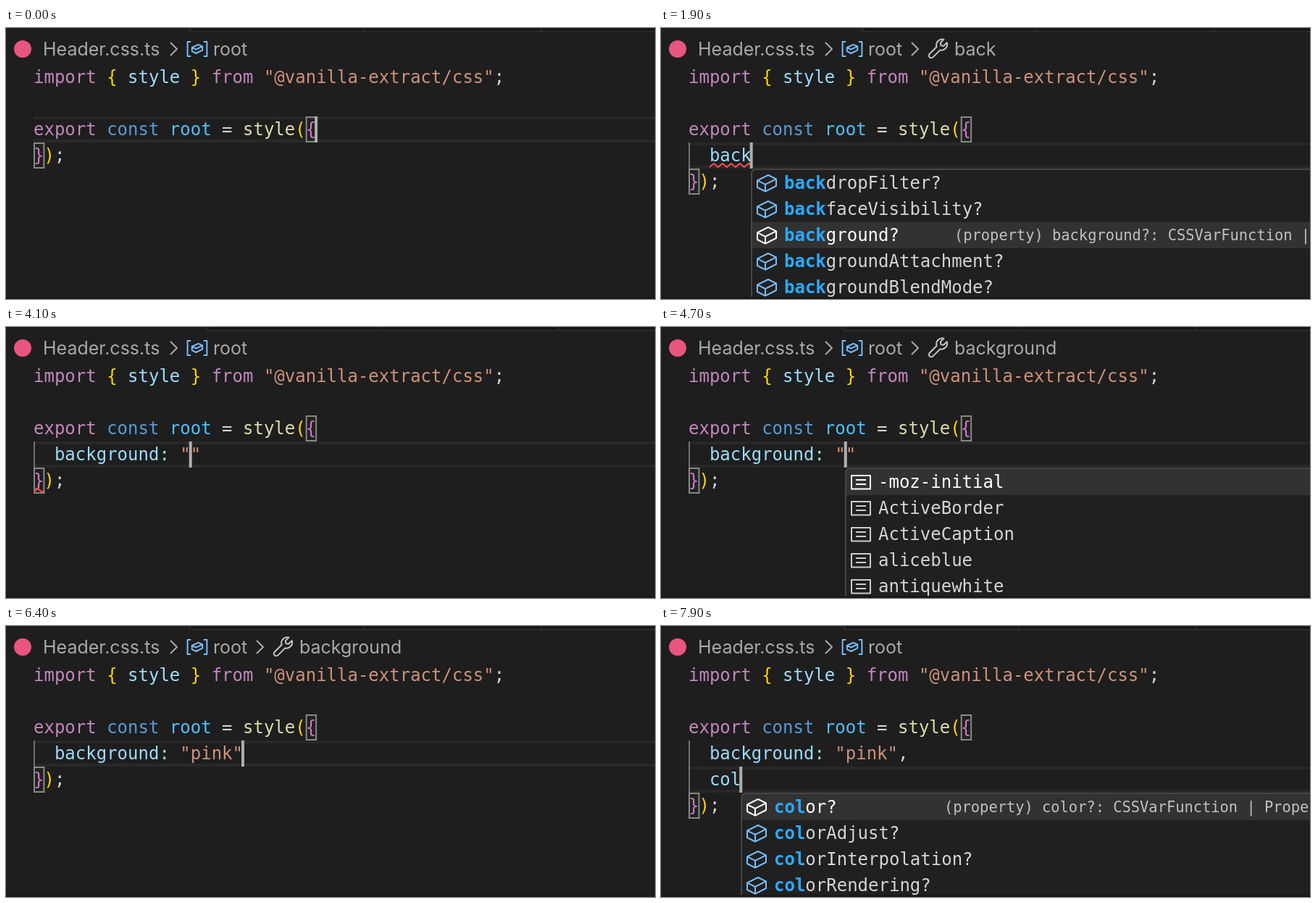
An HTML page with a canvas for the animation above (8000 ms loop, 896x374 px).

```html
<!DOCTYPE html>
<html lang="en">
<head>
<meta charset="utf-8">
<title>Typing styles in an editor</title>
<style>
  html, body { margin: 0; width: 100%; height: 100%; overflow: hidden; background: #1e1e1e; }
  canvas { display: block; }
</style>
</head>
<body>
<canvas id="stage" width="896" height="374"></canvas>
<script>
const ctx = document.getElementById('stage').getContext('2d');
const MONO = '"DejaVu Sans Mono", monospace';
const LOOP = 8000, LEFT = 38, TOP = 50, LINE = 36, CHAR = 24 * 0.60205;
const GOLD = '#ffd700', ORCHID = '#da70d6', PINK = '#c586c0', SKY = '#9cdcfe',
      STRING = '#ce9178', PLAIN = '#d4d4d4', BLUE = '#75beff';

const icons = {
  field: 'M1.5 6.2V11L7 13.8 14.5 10V5.2L9 2.5ZM1.5 6.2 7 8.9 14.5 5.2M7 8.9V13.8',
  value: 'M1.5 3.5H14.5V12.7H1.5ZM4.5 6.5H11.5M4.5 9.5H11.5',
  variable: 'M3.6 3H1.3V13H3.6M12.4 3H14.7V13H12.4M4.4 7V9.6L7.2 11 11.6 8.8V6.2L8.8 4.9ZM4.4 7 7.2 8.3 11.6 6.2',
  wrench: 'M13.9 4.1 11.6 6.4 9.7 6.1 9.4 4.2 11.7 1.9A4 4 0 0 0 6.8 7L1.9 11.9A1.5 1.5 0 0 0 4.2 14.2L9.2 9.2A4 4 0 0 0 13.9 4.1Z',
  chevron: 'M5.5 3.5 10 8 5.5 12.5'
};
for (const name in icons) icons[name] = new Path2D(icons[name]);

const back = ['backdropFilter?', 'backfaceVisibility?', 'background?', 'backgroundAttachment?', 'backgroundBlendMode?'];
const colors = ['color?', 'colorAdjust?', 'colorInterpolation?', 'colorRendering?'];
const pinkLine = '  background: "pink"';

// Each step changes part of the state; "inset" is the caret's distance from the line end.
const steps = [
  [0, { body: [], inset: 0, crumb: '', error: false, squiggle: null, list: null, icon: 'field', pick: 0, detail: false }],
  [200, { body: ['  '] }],
  [500, { body: ['  b'] }],
  [600, { body: ['  ba'], list: back }],
  [700, { body: ['  bac'] }],
  [800, { detail: true }],
  [900, { body: ['  back'] }],
  [1400, { crumb: 'back', error: true, squiggle: [3, 2, 4] }],
  [1500, { pick: 1 }],
  [1700, { pick: 2 }],
  [2100, { body: ['  background'], list: null, pick: 0, detail: false }],
  [2600, { crumb: 'background', squiggle: [3, 2, 10] }],
  [3100, { body: ['  background:'] }],
  [3200, { body: ['  background: '] }],
  [3500, { crumb: '', squiggle: [4, 0, 1] }],
  [3900, { body: ['  background: ""'], inset: 1 }],
  [4300, { list: ['-moz-initial', 'ActiveBorder', 'ActiveCaption', 'aliceblue', 'antiquewhite'], icon: 'value' }],
  [4500, { crumb: 'background', error: false, squiggle: null }],
  [5100, { body: ['  background: "p"'], list: ['padding-box', 'palegoldenrod', 'palegreen', 'paleturquoise', 'palevioletred'] }],
  [5300, { body: ['  background: "pi"'], list: ['pink', 'padding-box', 'paleturquoise', 'palevioletred', 'papayawhip'] }],
  [5400, { body: ['  background: "pin"'], list: ['pink', 'padding-box'] }],
  [5600, { body: [pinkLine], list: ['pink'] }],
  [5800, { list: null }],
  [6100, { inset: 0 }],
  [6500, { body: [pinkLine + ','] }],
  [7000, { body: [pinkLine + ',', '  '], crumb: '' }],
  [7200, { body: [pinkLine + ',', '  c'], icon: 'field' }],
  [7300, { list: ['captionSide?', 'caret?', 'caretColor?', 'clear?'] }],
  [7400, { body: [pinkLine + ',', '  co'], list: colors }],
  [7600, { body: [pinkLine + ',', '  col'] }],
  [7700, { detail: true }]
];

const colX = col => LEFT + col * CHAR;
const rowY = row => TOP + row * LINE;

function rect(color, x, y, w, h) {
  ctx.fillStyle = color;
  ctx.fillRect(x, y, w, h);
}

function text(str, x, y, color, font = '24px ' + MONO) {
  ctx.font = font;
  ctx.fillStyle = color;
  ctx.fillText(str, x, y);
}

function icon(name, x, y, color, width = 1) {
  ctx.save();
  ctx.translate(x, y);
  ctx.scale(2, 2);
  ctx.strokeStyle = color;
  ctx.lineWidth = width;
  ctx.lineJoin = 'round';
  ctx.stroke(icons[name]);
  ctx.restore();
}

function codeLine(row, tokens) {
  let col = 0;
  for (const [str, color] of tokens) {
    text(str, colX(col), rowY(row) + 26, color);
    col += str.length;
  }
}

function bodyTokens(line) {
  return line.split(/("[^"]*"|,)/).map(s => [s, s[0] === '"' ? STRING : s === ',' ? PLAIN : SKY]);
}

function bracketBox(row, col) {
  rect('rgba(0,100,0,.1)', colX(col), rowY(row), CHAR, LINE);
  ctx.strokeStyle = '#888';
  ctx.lineWidth = 2;
  ctx.strokeRect(colX(col) + 1, rowY(row) + 1, CHAR - 1, LINE - 2);
}

function squiggle(row, col, len) {
  const end = colX(col + len), y = rowY(row) + 31.5;
  ctx.save();
  ctx.beginPath();
  ctx.rect(colX(col), y - 5, end - colX(col), 10);
  ctx.clip();
  ctx.beginPath();
  for (let x = colX(col), up = 1; x < end + 6; x += 6, up = -up) ctx.lineTo(x, y + up * 2.4);
  ctx.strokeStyle = '#f14c4c';
  ctx.lineWidth = 2;
  ctx.stroke();
  ctx.restore();
}

function header(s) {
  const shift = s.error ? 24.5 : 0;
  rect('#181818', 254 + shift, 0, 896, 5);
  rect('#2b2b2b', 254 + shift, 4, 896, 2);
  for (const x of [253, 493, 738]) rect('#2b2b2b', x + shift, 0, 2, 6);

  const font = '25px Inter, sans-serif', gray = '#a9a9a9';
  ctx.fillStyle = '#e8557f';
  ctx.beginPath();
  ctx.arc(23, 29, 12, 0, 7);
  ctx.fill();
  text('Header.css.ts', 51, 38, gray, font);
  icon('chevron', 216, 13, gray);
  icon('variable', 248, 13, BLUE);
  text('root', 286, 38, gray, font);
  if (s.crumb) {
    icon('chevron', 335, 13, gray);
    icon('wrench', 367, 12, '#c5c5c5');
    text(s.crumb, 405, 38, gray, font);
  }
}

// Draws a label with the letters of the query picked out in order.
function label(str, query, x, y, color) {
  let hit = 0;
  [...str].forEach((ch, i) => {
    const match = hit < query.length && ch.toLowerCase() === query[hit];
    if (match) hit++;
    text(ch, x + i * CHAR, y, match ? '#2aaaff' : color, (match ? 'bold ' : '') + '24px ' + MONO);
  });
}

function popup(s, x, y, query) {
  ctx.save();
  ctx.beginPath();
  ctx.roundRect(x + 1, y + 1, 860, s.list.length * LINE + 6, 6);
  ctx.fillStyle = '#202020';
  ctx.fill();
  ctx.save();
  ctx.clip();
  rect('#323232', x, y + 2 + s.pick * LINE, 862, LINE);
  ctx.restore();
  ctx.strokeStyle = '#454545';
  ctx.lineWidth = 2;
  ctx.stroke();
  ctx.restore();

  s.list.forEach((name, i) => {
    const top = y + 2 + i * LINE, picked = i === s.pick, detailed = picked && s.detail;
    const short = detailed && name.length > 12 ? name.slice(0, 11) + '…' : name;
    icon(s.icon, x + 6, top + 2, picked ? '#fff' : s.icon === 'field' ? BLUE : '#ccc');
    label(short, query, x + 46, top + 26, picked ? '#fff' : PLAIN);
    if (detailed) {
      text(`(property) ${name}: CSSVarFunction | Property`, x + 281, top + 25, '#c0c0c0', '20.4px ' + MONO);
    }
  });
}

function draw(now) {
  const t = now % LOOP;
  const s = Object.assign({}, ...steps.filter(([at]) => at <= t).map(([, change]) => change));
  const count = s.body.length, caretRow = 2 + count, endRow = 3 + count;
  const last = count ? s.body[count - 1] : '';
  const caretCol = count ? last.length - s.inset : 27;
  const caretX = colX(caretCol), caretY = rowY(caretRow);

  rect('#1e1e1e', 0, 0, 896, 374);
  header(s);
  rect('#282828', LEFT, caretY, 896, 4);
  rect('#282828', LEFT, caretY + LINE - 4, 896, 4);
  if (count) rect('#707070', LEFT, rowY(3), 2, count * LINE);
  bracketBox(2, 26);
  bracketBox(endRow, 0);

  codeLine(0, [['import ', PINK], ['{ ', GOLD], ['style ', SKY], ['} ', GOLD], ['from ', PINK],
    ['"@vanilla-extract/css"', STRING], [';', PLAIN]]);
  codeLine(2, [['export ', PINK], ['const ', '#569cd6'], ['root ', '#4fc1ff'], ['= ', PLAIN],
    ['style', '#dcdcaa'], ['(', GOLD], ['{', ORCHID]]);
  s.body.forEach((line, i) => codeLine(3 + i, bodyTokens(line)));
  codeLine(endRow, [['}', ORCHID], [')', GOLD], [';', PLAIN]]);

  if (s.squiggle) squiggle(...s.squiggle);
  rect('#aeafad', caretX - 2, caretY, 4, LINE);
  if (s.list) popup(s, Math.round(caretX - 0.5), caretY + LINE, last.slice(0, caretCol).match(/\w*$/)[0]);
  rect('#191919', 0, 371, 896, 3);
  requestAnimationFrame(() => draw(performance.now()));
}
draw(performance.now());
</script>
</body>
</html>
```
